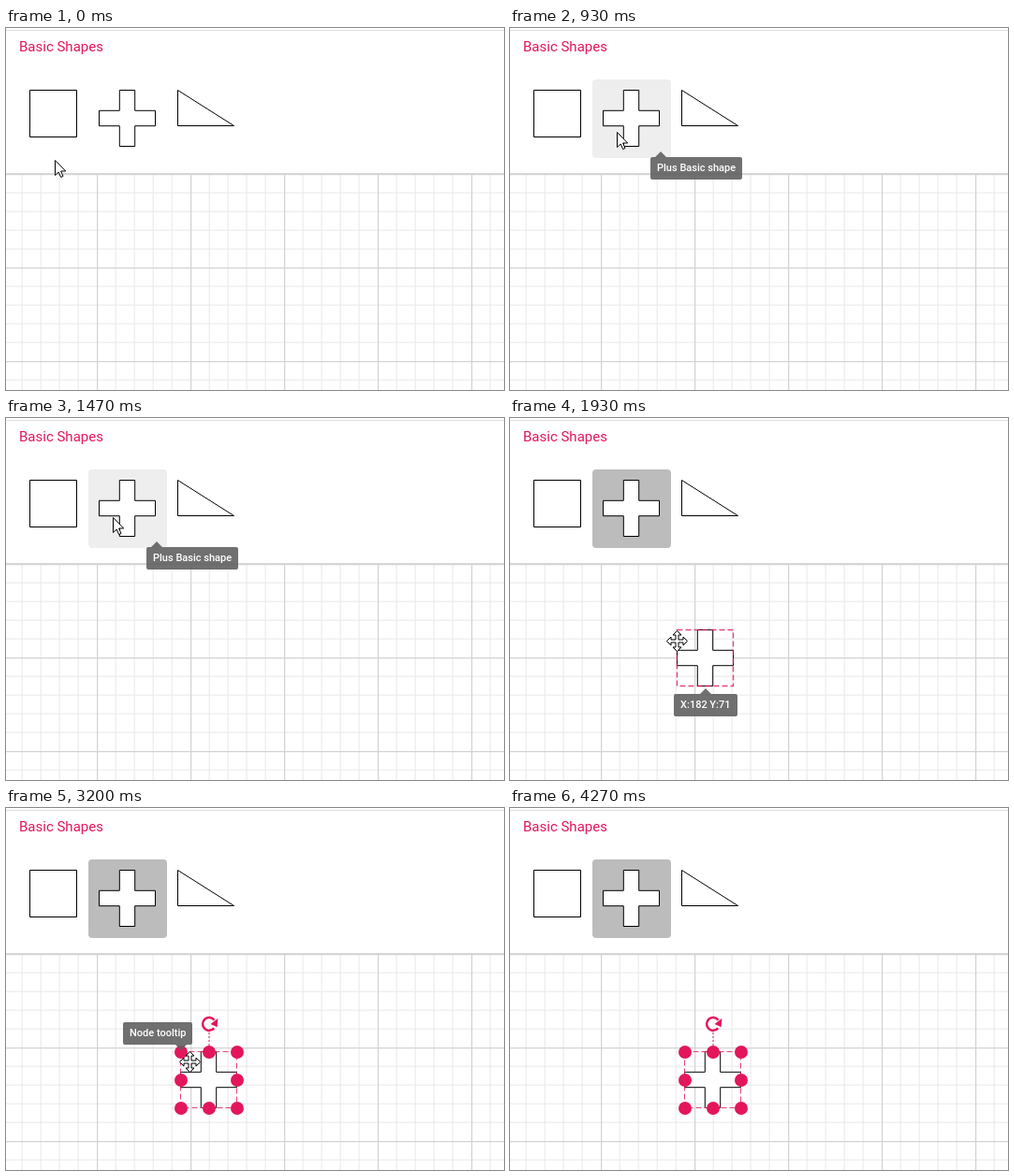
These frames come from a looping animation (532 by 387 pixels, 5.07 s). An HTML page:

```html
<!DOCTYPE html>
<html lang="en">
<head>
<meta charset="utf-8">
<title>Symbol palette tooltips</title>
<style>
  html, body { margin: 0; width: 100%; height: 100%; overflow: hidden; background: #fff; }
  svg { display: block; width: 532px; height: 387px; }
  text { font-family: Roboto, sans-serif; }
  .shape { fill: #fff; stroke: #000; }
  .accent { fill: none; stroke: #e3165b; }
  .cursor { fill: #fff; stroke: #000; }
</style>
</head>
<body>
<svg viewBox="0 0 532 387" xmlns="http://www.w3.org/2000/svg">
  <rect y="2" width="532" height="1" fill="#ddd"/>
  <text x="14" y="25" font-size="15" fill="#e3165b">Basic Shapes</text>
  <g id="grid"></g>
  <rect y="155" width="532" height="1" fill="#d9d9d9"/>
  <rect id="hover" rx="4"/>
  <path class="shape" d="M25.5 66.5h50v50h-50z"/>
  <path class="shape" id="plus"/>
  <path class="shape" d="M183.5 66.5v38h60z"/>
  <g id="node">
    <path class="shape" id="nodePlus"/>
    <rect class="accent" id="frame" x="-.5" y="-.5" width="60" height="60" stroke-dasharray="6 3" stroke-opacity=".8"/>
    <g id="handles">
      <path class="accent" d="M30 -21V-7" stroke-dasharray="2 2"/>
      <path class="accent" d="M35.3 -25.6A6.9 6.9 0 1 1 35.5 -34.2" stroke-width="2.5"/>
      <path d="M39.3 -36l-.6 9.3-7.2-3.4z" fill="#e3165b"/>
    </g>
  </g>
  <g id="tip">
    <path id="bubble" fill="#616161" fill-opacity=".9"/>
    <text id="label" font-size="11" font-weight="500" fill="#fff"></text>
  </g>
  <path class="cursor" id="arrow" d="M.5 .5V16.5L4.2 13 6.6 18.5 9 17.5 6.6 12H11.7Z"/>
  <path class="cursor" id="move"/>
</svg>
<script>
const LOOP = 5070;
const $ = id => document.getElementById(id);
const set = (el, attrs) => { for (const k in attrs) el.setAttribute(k, attrs[k]); };
const show = (el, on) => set(el, { visibility: on ? "inherit" : "hidden" });
const add = (parent, tag, attrs) => {
  const el = document.createElementNS("http://www.w3.org/2000/svg", tag);
  set(el, attrs);
  parent.appendChild(el);
};
const inside = (b, x, y) => x >= b.x && x < b.x + b.w && y >= b.y && y < b.y + b.h;

const SYMBOLS = [
  { name: "Rectangle", x: 14, y: 55, w: 74, h: 74 },
  { name: "Plus", x: 88, y: 55, w: 84, h: 84 },
  { name: "RightTriangle", x: 172, y: 55, w: 84, h: 62 }
];
const NODE = { x: 187, y: 261, w: 60, h: 60 };

// Times are in ticks, 15 per second
const START = { x: 52, y: 141 };
const MOVES = [
  { from: 0, to: 3, x: 46, y: 102 },
  { from: 6, to: 11, x: 115, y: 110 },
  { from: 11, to: 13, x: 114, y: 111 },
  { from: 14, to: 18, x: 179, y: 111 },
  { from: 19, to: 21, x: 114, y: 106 },
  { from: 26, to: 29, x: 178, y: 238 },
  { from: 29, to: 32, x: 186, y: 272 },
  { from: 36, to: 38, x: 90, y: 221 },
  { from: 38, to: 43, x: 142, y: 253 },
  { from: 43, to: 47, x: 196, y: 271 },
  { from: 54, to: 57, x: 62, y: 290 },
  { from: 59, to: 63, x: 46, y: 372 }
];
const PRESS = 26, DROP = 36, LEAVE = 64;

function plusPath(x, y) {
  const a = 21.8, b = 16.4;
  return `M${x + a} ${y}h${b}v${a}h${a}v${b}h${-a}v${a}h${-b}v${-a}h${-a}v${-b}h${a}z`;
}

function movePath() {
  let quarter = [[0, -11], [4.5, -6.5], [1.5, -6.5], [1.5, -1.5], [6.5, -1.5], [6.5, -4.5]];
  const points = [];
  for (let i = 0; i < 4; i++) {
    points.push(...quarter);
    quarter = quarter.map(([x, y]) => [-y, x]);
  }
  return "M" + points.join("L") + "Z";
}

function build() {
  const line = (d, major) => add($("grid"), "path", {
    d, fill: "none", stroke: major ? "#d3d3d3" : "#e8e8e8", "stroke-width": major ? 1.25 : 1
  });
  for (const major of [false, true]) {
    const shift = major ? 0.625 : 0.125;
    for (let i = 0; i < 27; i++) {
      if ((i % 5 === 0) !== major) continue;
      line(`M${i * 20 - 3 + shift} 156V387`, major);
      if (i < 12) line(`M0 ${i * 20 + 156 + shift}H532`, major);
    }
  }
  for (let i = 0; i < 9; i++) {
    if (i !== 4) add($("handles"), "circle", { cx: i % 3 * 30, cy: Math.floor(i / 3) * 30, r: 7, fill: "#e3165b" });
  }
  set($("plus"), { d: plusPath(99.5, 66.5) });
  set($("nodePlus"), { d: plusPath(-0.5, -0.5) });
  set($("move"), { d: movePath() });
}

// Pointer position, and how many ticks it has rested (negative while moving)
function pointerAt(tick) {
  const i = Math.max(0, MOVES.findLastIndex(m => m.from < tick));
  const a = MOVES[i - 1] || START, b = MOVES[i];
  const p = Math.min(1, (tick - b.from) / (b.to - b.from));
  const f = 1 - (1 - p) ** 2;
  return {
    x: Math.round(a.x + (b.x - a.x) * f),
    y: Math.round(a.y + (b.y - a.y) * f),
    rest: tick - b.to
  };
}

// A tip starts at x, or is centred on cx; its tail sits at tail
function drawTip(tip, opacity) {
  show($("tip"), tip);
  if (!tip) return;
  $("label").textContent = tip.text;
  const w = Math.round($("label").getComputedTextLength()) + 14;
  const x = tip.cx ? tip.cx - w / 2 : tip.x;
  const { y, tail, below } = tip;
  const box = `M${x + 2} ${y}h${w - 4}q2 0 2 2v20q0 2 -2 2h${4 - w}q-2 0 -2 -2v-20q0 -2 2 -2z`;
  const peak = below ? `M${tail - 6} ${y + 24}h12l-6 6z` : `M${tail - 6} ${y}h12l-6 -6z`;
  set($("bubble"), { d: box + peak });
  set($("label"), { x: x + 7, y: y + 15 });
  set($("tip"), { opacity });
}

function symbolTip(s) {
  const x = s.x + s.w - 22;
  return { text: s.name + " Basic shape", x, y: s.y + s.h - 1, tail: x + 11 };
}

function nodeTip() {
  return { text: "Node tooltip", x: NODE.x - 62, y: NODE.y - 32, tail: NODE.x, below: true };
}

function dragTip(left, top) {
  const cx = left + 30;
  return { text: `X:${left + 3} Y:${top - 156}`, cx, y: top + 68, tail: cx };
}

function render(ms) {
  let tick = Math.round(ms * 0.015);
  if (Math.round(tick * 20 / 3) * 10 > ms) tick--;

  const { x, y, rest } = pointerAt(tick);
  const picked = tick >= PRESS;
  const dropped = tick >= DROP;
  const dragging = tick > PRESS && !dropped;
  const overNode = dropped && inside(NODE, x, y);
  const left = dropped ? NODE.x : x + 1;
  const top = dropped ? NODE.y : y - 11;

  const symbol = picked ? SYMBOLS[1] : SYMBOLS.find(s => inside(s, x, y));
  show($("hover"), symbol);
  if (symbol) set($("hover"), {
    x: symbol.x, y: symbol.y, width: symbol.w, height: symbol.h, fill: picked ? "#bcbcbc" : "#eee"
  });

  show($("node"), dragging || dropped);
  set($("node"), { transform: `translate(${left} ${top})` });
  set($("frame"), { "stroke-width": dropped ? 1 : 1.4 });
  show($("handles"), dropped);

  let tip = null;
  if (dragging) tip = dragTip(left, top);
  else if (rest >= 0 && overNode) tip = nodeTip();
  else if (rest >= 0 && symbol && !picked) tip = symbolTip(symbol);
  drawTip(tip, dragging ? 1 : Math.min(1, (rest + 1) / 2));

  show($("move"), dragging || overNode);
  show($("arrow"), !dragging && !overNode && tick < LEAVE);
  set($("move"), { transform: `translate(${x + 0.5} ${y + 0.5})` });
  set($("arrow"), { transform: `translate(${x} ${y})` });
}

build();
const start = performance.now();
function loop(now) {
  render(Math.max(0, now - start) % LOOP);
  requestAnimationFrame(loop);
}
render(0);
requestAnimationFrame(loop);
</script>
</body>
</html>
```
